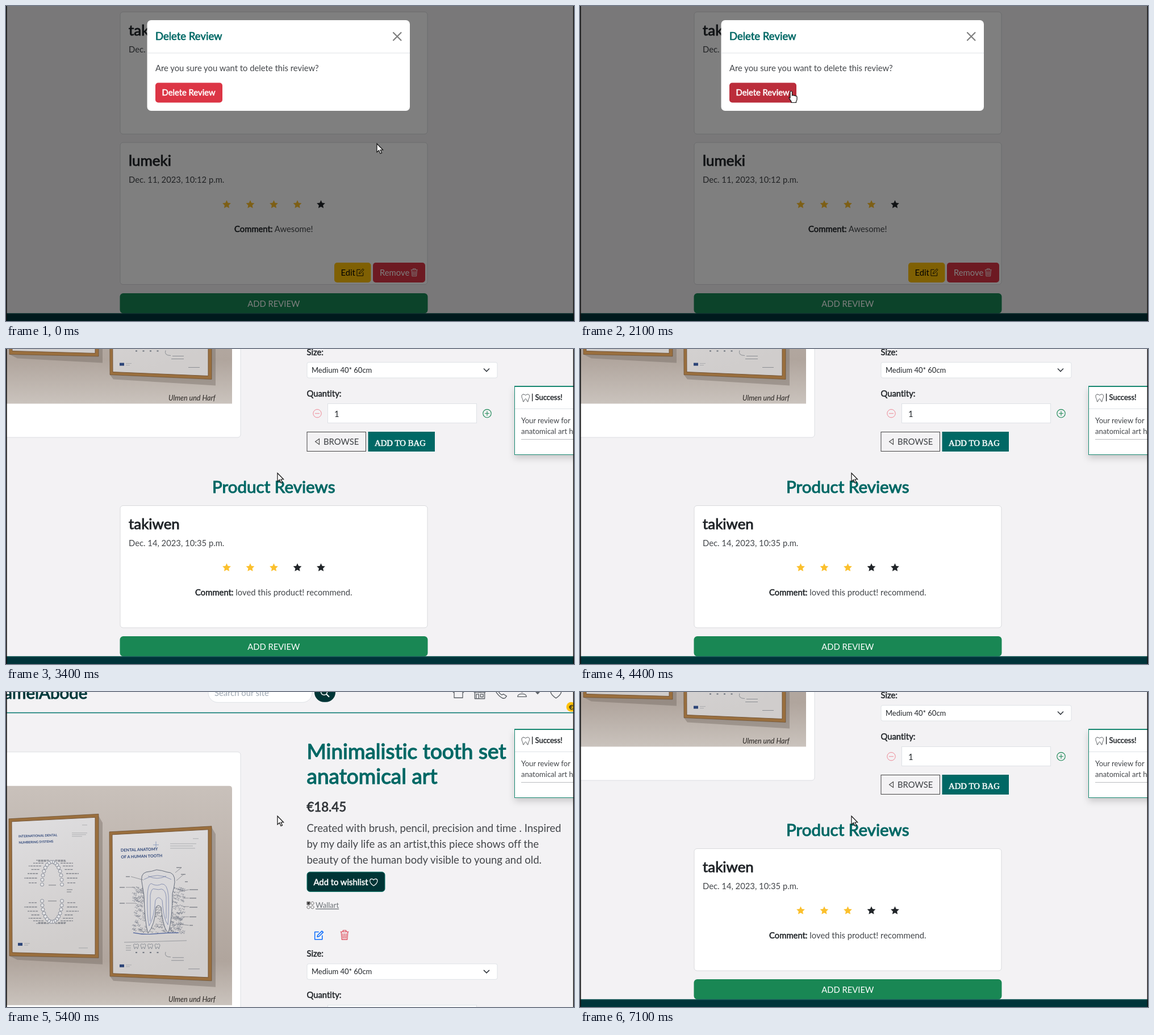
Write an HTML page that moves like this. It is 1000 px wide and 556 px high and loops after 7.2 s.

```html
<!DOCTYPE html>
<html lang="en">
<head>
<meta charset="utf-8">
<title>Deleting a review</title>
<style>
html, body { margin: 0; width: 100%; height: 100%; overflow: hidden; background: #f3f2f4; }
svg { display: block; width: 100vw; height: 100vh; font-family: Lato, "Open Sans", sans-serif; }
text { white-space: pre; font-variant-ligatures: none; }
</style>
</head>
<body>
<svg id="stage" viewBox="0 0 1000 556" preserveAspectRatio="none"></svg>
<script>
const LOOP = 7200, STEP = 100, PAGE_LOADS = 2500, BOTTOM = 487.5;
const INK = '#212529', BODY = '#43464a', TEAL = '#006865', DARK = '#003536', LINE = '#dee2e6', PRINT = '#2d4578';
const BASE = 14.8, SMALL = 13;

// Drawing helpers
const rect = (x, y, w, h, fill, rx = 0, extra = '') =>
  `<rect x="${x}" y="${y}" width="${w}" height="${h}" rx="${rx}" fill="${fill}" ${extra}/>`;
const edge = (color, w = 1) => `stroke="${color}" stroke-width="${w}"`;
const text = (x, y, size, str, fill = BODY, extra = '') =>
  `<text x="${x}" y="${y}" font-size="${size}" fill="${fill}" ${extra}>${str}</text>`;
const bold = (x, y, size, str, fill = INK, extra = '') =>
  text(x, y, size, str, fill, `${edge(fill, size / 28)} ${extra}`);
const path = (d, color, w = 1, fill = 'none', extra = '') =>
  `<path d="${d}" fill="${fill}" ${edge(color, w)} ${extra}/>`;
const shade = (d, fill, opacity) => `<path d="${d}" fill="${fill}" opacity="${opacity}"/>`;
const circle = (x, y, r, fill, extra = '') => `<circle cx="${x}" cy="${y}" r="${r}" fill="${fill}" ${extra}/>`;
const icon = (name, x, y, size, color, w = 1) =>
  path(ICONS[name], color, w, 'none', `stroke-linejoin="round" transform="translate(${x} ${y}) scale(${size / 16})"`);
const middle = 'text-anchor="middle"';

const ICONS = {
  pencil: 'M13.5 8v6.5h-12v-12H8M5.5 10.5l.7-2.8L13 1l2 2-6.8 6.8Z',
  trash: 'M1.5 3h13M5.5 2.5V.8h5v1.7M2.8 3.5l1 11.7h8.4l1-11.7M5.3 5.5l.5 8M8 5.5v8M10.7 5.5l-.5 8',
  heart: 'M8 14.2C-1 8.5.3 2.3 4 1.6Q7 1.3 8 3.8Q9 1.3 12 1.6C15.7 2.3 17 8.5 8 14.2Z',
  house: 'M.7 8 8 1l7.3 7M2.3 6.8v8h11.4v-8M12 4.5V1.8h1.7v4.5',
  shop: 'M2.5 1h11l2 4.5q0 2-2 2t-2-2q0 2-1.8 2T8 5.5q0 2-1.7 2t-1.8-2q0 2-2 2t-2-2ZM.5 5.5h15M1.7 7.5v7.7h12.6V7.5M3.5 15V9.5h3.3V15M9 9.5h3.5V13H9Z',
  phone: 'M3.4 1.1 1.2 2.9Q.3 4.4 2 7.2Q5.3 12.6 10 14.9Q12.3 15.8 13.5 14.5L15.2 12.5 11.4 9.9 9 10.9Q6.6 9.5 5.1 6.9L6 4.4Z',
  person: 'M8 1.5a3 3 0 1 0 .01 0ZM1.8 14q0-4 6.2-4t6.2 4Z',
  tooth: 'M8 3.2C4 .2 1 1.4 1 5c0 4 2.2 4.5 2.6 10 2.2.8 2-5.2 4.4-5.2s2.2 6 4.4 5.2C12.8 9.5 15 9 15 5c0-3.6-3-4.8-7-1.8Z',
  grid: 'M1 1h6v6H1ZM12 1a3 3 0 1 0 .01 0ZM4 9a3 3 0 1 0 .01 0ZM12 9a3 3 0 1 0 .01 0ZM2.5 4l1.5 1.5 3-4'
};

function star(cx, cy, color) {
  const points = Array.from({ length: 10 }, (_, i) => {
    const a = i * Math.PI / 5 - Math.PI / 2, r = i % 2 ? 3.8 : 7.8;
    return `${(cx + r * Math.cos(a)).toFixed(1)},${(cy + .5 + r * Math.sin(a)).toFixed(1)}`;
  });
  return `<polygon points="${points.join(' ')}" fill="${color}"/>`;
}

function reviewCard(y, height, name, date, stars, comment) {
  const row = [0, 1, 2, 3, 4].map(i => star(388.5 + 41.5 * i, y + 109, i < stars ? '#fbc02d' : INK)).join('');
  return rect(201, y, 541, height, '#fff', 5, edge('#d9dadd')) +
    bold(216, y + 41, 25.9, name) + text(216, y + 71, BASE, date) + row +
    `<text x="471.3" y="${y + 158}" font-size="${BASE}" fill="${BODY}" ${middle}>` +
    `<tspan fill="${INK}" ${edge(INK, .55)}>Comment:</tspan> ${comment}</text>`;
}
const firstReview = y => reviewCard(y, 215.5, 'takiwen', 'Dec. 14, 2023, 10:35 p.m.', 3, 'loved this product! recommend.');
const pageEnd = y => rect(200.5, y, 542, 35.5, '#198754', 6) +
  text(471.3, y + 23.5, BASE, 'ADD REVIEW', '#fff', middle) +
  rect(0, y + 35.5, 1000, 30, '#00343a') + rect(0, y + 35.5, 1000, 1.2, '#0b5955');

function modalScene() {
  return rect(0, 0, 1000, 556, '#f3f2f4') + firstReview(10.5) +
    reviewCard(241, 250.5, 'lumeki', 'Dec. 11, 2023, 10:12 p.m.', 4, 'Awesome!') +
    rect(578, 453, 64.5, 35, '#ffc107', 5) + text(589.5, 476, BASE, 'Edit', '#000') + icon('pencil', 616.5, 463, 14.5, '#000') +
    rect(646, 453, 92, 35, '#dc3545', 5) + text(658, 476, BASE, 'Remove', '#fff') + icon('trash', 711.5, 463, 14.5, '#fff') +
    pageEnd(507) + rect(0, 0, 1000, 556, '#000', 0, 'opacity=".5"') +
    rect(248.5, 25, 462.5, 160, '#fff', 7) + bold(263, 60, 18.5, 'Delete Review', TEAL) +
    path('M248.5 83H711', LINE) + path('M682 47l13.5 13.5m0-13.5l-13.5 13.5', '#7f7f7f', 2.2, 'none', 'stroke-linecap="round"') +
    text(263, 115, BASE, 'Are you sure you want to delete this review?') +
    rect(263, 135.5, 118, 35, '#dc3545', 5, 'id="confirm"') + bold(274.5, 158, BASE, 'Delete Review', '#fff');
}

// Soft stand-in for the framed wall prints
const poster = (outer, inner) => path(outer, '#5d4227', .6, '#9a6f3e') + path(inner, '#6f5032', .9, 'url(#paper)');
const heading = (x, y, size, gap, lines) => `<g transform="rotate(-2 ${x} ${y})" font-weight="700">` +
  lines.map((line, i) => text(x, y + gap * i, size, line, PRINT)).join('') + '</g>';

function numberingPrint() {
  let s = poster('M5 255 163 246.5V500.5L6 497Z', 'M10 260 157 252.5V495L11 491Z') +
    heading(22, 288, 5.7, 11, ['INTERNATIONAL DENTAL', 'NUMBERING SYSTEMS']);
  for (const [cy, ry, dir] of [[371, 40, -1], [400, 37, 1]]) {
    for (let i = 0; i < 16; i++) {
      const a = Math.PI * i / 15, c = Math.cos(a), side = Math.sign(c), y = cy + dir * ry * Math.sin(a);
      s += circle((81 + 17.5 * c).toFixed(1), y.toFixed(1), 3, '#e3e3e5', edge('#707784', .8));
      const near = 81 + 24 * c + side * 3, far = near + side * (14 + i % 3 * 4);
      s += path(`M${near.toFixed(1)} ${(y + dir * 3).toFixed(1)}H${far.toFixed(1)}`, '#7c7f86', 1.3, 'none', 'stroke-dasharray="4 1"');
    }
  }
  return s + path('M75 372h13M74 400h15M107 380h10M107 384h8', '#8d8f94', 1.2) +
    rect(21, 474, 8, 5, PRINT) + path('M32 475h10M32 478h7M128 483h16', '#9a9ca0', .8) +
    path('M116 280h27M116 283h25M116 286h18M134 266h9', '#a4a5a9', .8);
}

function anatomyPrint() {
  let s = poster('M182 278 362 268V541L183 533Z', 'M187 283 356 274V535L188 528Z') +
    heading(202, 313, 7.2, 12, ['DENTAL ANATOMY', 'OF A HUMAN TOOTH']);
  let seed = 7, gum = '';
  const rnd = () => (seed = seed * 16807 % 2147483647) / 2147483647;
  for (let i = 0; i < 420; i++) {
    gum += `M${(222 + rnd() * 89).toFixed(1)} ${(376 + rnd() * 81).toFixed(1)}q1-3 2.5 0t2-1`;
  }
  return s + path(gum, '#7d828d', .7) +
    path('M240 372q-5-20 7-23 10-1 18-4 10 1 18 4 15 0 14 18-1 10-4 20 0 44-7 69-9-5-13-45-5-6-9 0-2 32-14 46-6-20-7-66Z', '#656c7a', 1, '#d9d8da') +
    path('M249 388q2-24 10-17 8 3 15-1 10-1 12 21 1 30-1 51-8-10-10-43-7-10-12 0-2 30-11 45-4-15-3-56M254 390q2-14 8-11 7 2 12 0 7 2 8 14v38M254 390v46M243 362q23-14 48 0M250 356q16 8 32 0', '#7580a8', .8) +
    path('M224 456q18 4 38 2t42-2', '#4a5f9a', 1.2) +
    path('M220 357l22 6M211 376h16M211 404h18M298 350l11-9M300 364l13-11M304 384l18-4M311 395h11M312 410h10M312 428h10M305 441l17 2', '#777a81', .7) +
    path('M211 357h7M200 376h9M200 404h9M300 341h9M308 353h8M315 366h5M323 380h15M323 395h12M323 411h14M323 428h12M323 443h6', '#777a81', 1.3) +
    path('M208 473l110-3M211 479h9M211 483h9M211 487h9', '#898c92', .8) +
    [0, 1, 2, 3].map(i => icon('tooth', 224 + i * 12.5, 475, 10, '#6d737d', 1.2) + rect(228 + i * 12.5, 490, 3, 2, '#6d737d')).join('') +
    path('M281 490q-3 9 9 9M293 500h20M291 505h22M321 520h20', '#85888e', .9) +
    path('M264 295v12m-5-6h10', '#7f93b8', .8) + rect(200, 512, 8, 5, PRINT) +
    path('M211 513h10M211 516h7M289 299h46M289 303h40M289 307h44M329 290h10', '#a2a4a8', .8);
}

function photo() {
  return '<path d="M-20 197H393q5 0 5 5V584H-20Z" fill="url(#wall)"/>' +
    shade('M163 250l7 12v250l-150-8-14-7 157 3.500ZM362 270l7 12v270l-180-11-6-8 179 8Z', '#6f645c', .4) +
    numberingPrint() + anatomyPrint() +
    text(286, 578, 12.5, 'Ulmen und Harf', '#2c2825', 'font-style="italic"');
}

function header() {
  const gray = '#5c6166';
  return bold(143.5, 43, 29.6, 'EnamelAbode', '#00393b', 'text-anchor="end"') +
    rect(356, 15.5, 183, 34, '#fff', 17, edge(LINE)) + text(367, 38, BASE, 'Search our site', '#9da7b2') +
    rect(543, 15, 37, 34, DARK, 17) + circle(560, 31, 5.5, 'none', edge('#fff', 1.5)) + path('M564 35l5 5', '#fff', 2) +
    icon('house', 786, 22, 21, gray) + icon('shop', 823, 22, 22, gray) + icon('phone', 860, 21, 22.5, gray) +
    icon('person', 898.5, 22, 20, gray) + path('M930 28.5h12l-6 6.5Z', gray, 1, gray) +
    icon('heart', 957, 22, 22.5, gray) + path('M994 24h3l5 14', INK, 1.8) +
    circle(980, 16, 10.3, '#00706a') + bold(980, 20.3, 12.5, '1', '#fff', middle) +
    circle(995, 57.5, 8.5, '#ffc107') + bold(995, 62, 12, '€', INK, middle) +
    rect(0, 67, 1000, 1.6, '#0a7a72');
}

function productDetails() {
  const lines = ['Created with brush, pencil, precision and time . Inspired',
    'by my daily life as an artist,this piece shows off the', 'beauty of the human body visible to young and old.'];
  return bold(529.5, 149, 37, 'Minimalistic tooth set', TEAL) + bold(529.5, 193.5, 37, 'anatomical art', TEAL) +
    bold(529.5, 242, 22.2, '€18.45', '#303438') +
    lines.map((line, i) => text(529.5, 278.5 + 27.8 * i, 18.5, line)).join('') +
    rect(530, 349, 137, 34.5, DARK, 5, edge('#08776a')) + bold(541.5, 372, BASE, 'Add to wishlist', '#fff') + icon('heart', 639.5, 359.5, 15.5, '#fff', 1.2) +
    icon('grid', 529, 400.5, 14, '#555') + rect(530.5, 402, 4, 4, '#333') +
    text(545, 412.5, SMALL, 'Wallart', '#6c7176', 'text-decoration="underline"') +
    icon('pencil', 542, 452, 17.5, '#0d6efd', 1.4) + icon('trash', 587, 451, 18, '#dc3545') +
    bold(529.5, 498, BASE, 'Size:') + rect(530, 511, 335, 27.5, '#fff', 3, edge(LINE)) +
    text(538, 529.3, SMALL, 'Medium 40* 60cm', INK) + path('M841 522l5 5 5-5', '#343a40', 1.6) +
    bold(529.5, 571, BASE, 'Quantity:') + rect(566.5, 584, 262, 34, '#fff', 0, edge(LINE)) + text(578, 607, BASE, '1', INK) +
    circle(548, 601.3, 7.2, 'none', edge('#ee8794')) + path('M544 601.3h8', '#ee8794') +
    circle(847, 601.3, 7.2, 'none', edge('#198754', 1.1)) + path('M843 601.3h8m-4-4v8', '#198754', 1.1) +
    rect(530, 634, 103.5, 34, 'none', 0, edge('#444')) + path('M551.5 646v10l-7-5Z', '#444', 1.1) + text(559, 656.5, BASE, 'BROWSE', '#3b3e42') +
    rect(637.5, 633.5, 117.5, 35, TEAL) + bold(649, 658.5, BASE, 'ADD TO BAG', '#fff', 'font-family="Liberation Serif, serif"');
}

function productPage() {
  return header() + rect(-30, 137, 443, 506.5, '#fff', 5, edge('#dcdee2')) + photo() + productDetails() +
    bold(471.3, 741.5, 29.6, 'Product Reviews', TEAL, middle) + firstReview(764) + pageEnd(994.5);
}

function toast() {
  return rect(895.5, 66, 130, 120.5, '#fff', 0, `${edge('#178871')} filter="url(#shadow)"`) + rect(895, 65, 130, 2, '#178871') +
    icon('tooth', 907, 78.5, 15.5, '#4d5155') + bold(925, 90, SMALL, '| Success!') + path('M896 105.5H1000', LINE) +
    text(907, 131, SMALL, 'Your review for') + text(907, 150, SMALL, 'anatomical art has') + path('M907 159.5H1000', '#b9bcc0');
}

const stage = document.getElementById('stage');
stage.innerHTML = `<defs>
  <linearGradient id="wall" x1="0" y1="0" x2="0" y2="1">
    <stop offset="0" stop-color="#c9c1bb"/><stop offset=".45" stop-color="#bbb1aa"/>
    <stop offset=".8" stop-color="#b0a59d"/><stop offset="1" stop-color="#cac3bd"/>
  </linearGradient>
  <linearGradient id="paper" x1="0" y1="0" x2=".2" y2="1">
    <stop offset="0" stop-color="#dfdee0"/><stop offset="1" stop-color="#d0cdcc"/>
  </linearGradient>
  <filter id="shadow" x="-20%" y="-20%" width="140%" height="150%"><feDropShadow dx="0" dy="6" stdDeviation="6" flood-opacity=".17"/></filter>
  </defs>
  <g id="product">${rect(0, 0, 1000, 556, '#f3f2f4')}<g id="scroller">${productPage()}</g>${toast()}</g>
  <g id="modal">${modalScene()}</g>
  ${rect(0, 0, 1.6, 556, '#111')}${rect(998.6, 0, 1.4, 556, '#111')}
  <g id="cursor">
    ${path('M0 0V15l3.5-3.2 2.5 5.7 2.5-1.1-2.5-5.4h4.6Z', '#111', 1.2, '#fff', 'id="arrow"')}
    ${path('M-2 1.5Q-.3-1 1.5 1.5V8Q3 6.3 4.6 8.4 6.2 7 7.6 9 9.6 8.2 10 10.5V15Q9.7 17 8.5 18.5V20.5H0V18.5Q-2.5 15.5-4 12-3.5 10-2 12Z', '#111', 1.2, '#fff', 'id="hand"')}
  </g>`;
const $ = id => document.getElementById(id);
const show = (id, on) => $(id).setAttribute('visibility', on ? 'visible' : 'hidden');

// Motion
const ease = (t, start, end) => {
  const u = Math.min(1, Math.max(0, (t - start) / (end - start)));
  return u * u * (3 - 2 * u);
};
const scrollAt = t => BOTTOM * (ease(t, 2900, 3400) - ease(t, 4500, 5564) + ease(t, 6400, 7000));
function pointerAt(t) {
  const approach = ease(t, 0, 1600), leave = ease(t, 2200, 2700);
  return [653 - 281 * approach + 106 * leave, 243 - 93 * approach + 69 * leave];
}

function render(t) {
  const modal = t < PAGE_LOADS, [x, y] = pointerAt(t);
  const hover = modal && x < 381 && y > 135 && y < 170.5;
  show('modal', modal);
  show('product', !modal);
  show('arrow', !hover);
  show('hand', hover);
  $('confirm').setAttribute('fill', hover ? '#bb2d3b' : '#dc3545');
  $('cursor').setAttribute('transform', `translate(${x} ${y})`);
  $('scroller').setAttribute('transform', `translate(0 ${-scrollAt(t)})`);
}

const origin = performance.now();
function tick() {
  const t = (performance.now() - origin) % LOOP;
  render(Math.floor(t / STEP) * STEP);
  requestAnimationFrame(tick);
}
tick();
</script>
</body>
</html>
```
